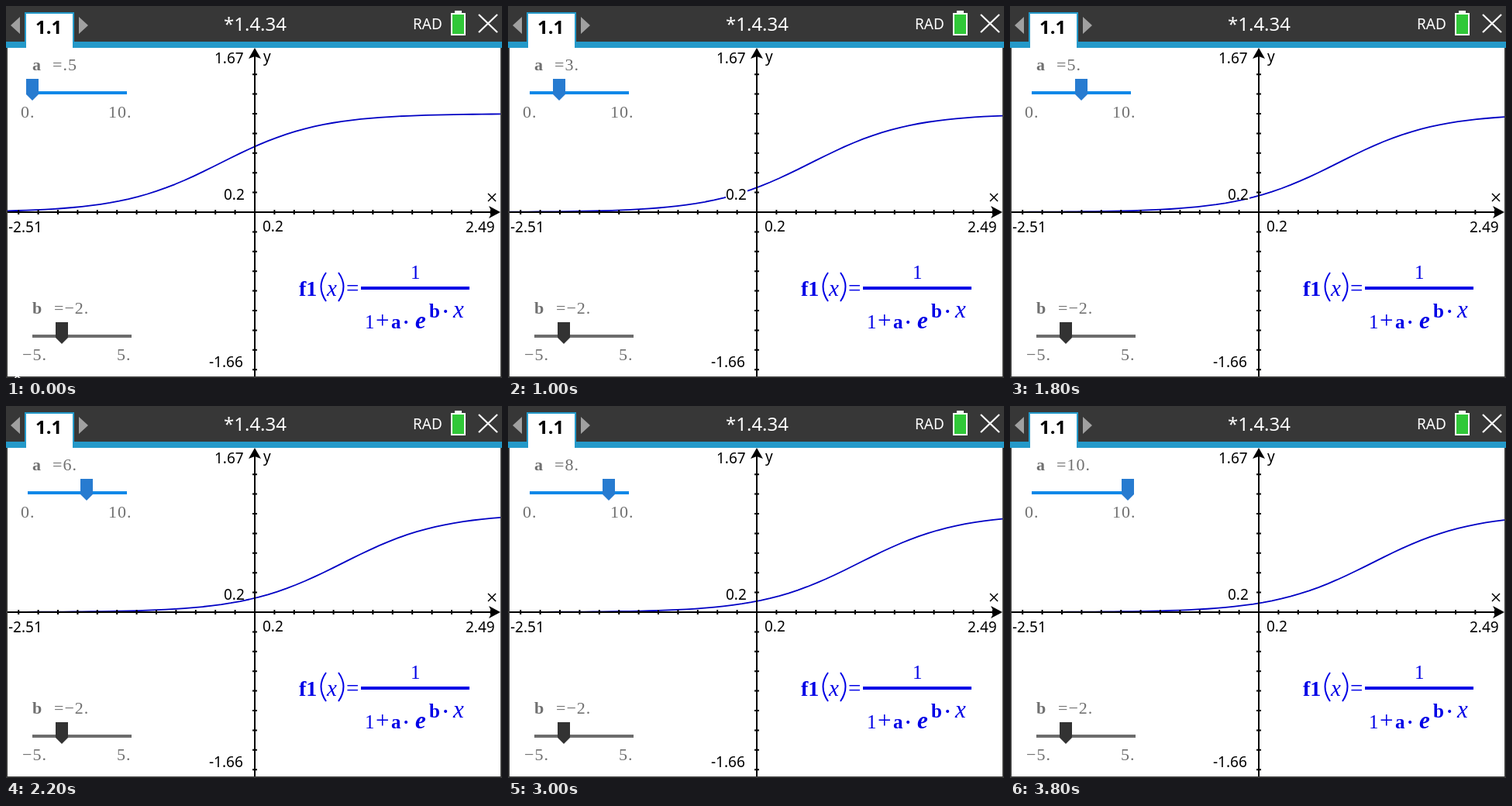
Recreate the animation shown at these times as an HTML page. Size 640 by 480 pixels, loop 4 s.

```html
<!DOCTYPE html>
<html lang="en">
<head>
<meta charset="utf-8">
<title>Logistic curve with sliders</title>
<style>
  html, body { margin: 0; width: 100%; height: 100%; overflow: hidden; background: #373737; }
  svg { display: block; width: 640px; height: 480px; }
  text { white-space: pre; }
  .sans { font: 500 19px "Noto Sans", "Open Sans", sans-serif; }
  .title { font-size: 24px; font-weight: 400; }
  .tab { font-size: 24px; font-weight: 600; }
  .slider { font: 22px "Liberation Serif", "Noto Serif", serif; letter-spacing: 1px; fill: #707070; }
  .math { font: 25px "Liberation Serif", "Noto Serif", serif; fill: #0000e6; }
  .bold { font-weight: 700; }
  .italic { font-style: italic; }
  .stroke { fill: none; stroke: #000; stroke-width: 2; }
</style>
</head>
<body>
<svg viewBox="0 0 640 480">
  <!-- header -->
  <rect width="640" height="480" fill="#373737"/>
  <rect y="46" width="640" height="8" fill="#2499c9"/>
  <rect x="2" y="54" width="636" height="424" fill="#fff"/>
  <rect x="24" y="8" width="64" height="46" fill="#2499c9"/>
  <rect x="26" y="10" width="60" height="44" fill="#fff"/>
  <path d="M18 14V36L6 25ZM94 14V36L106 25Z" fill="#a0a0a0"/>
  <text class="sans tab" x="38" y="36">1.1</text>
  <g fill="#fff">
    <text class="sans title" x="281" y="32">*1.4.34</text>
    <text class="sans" x="525" y="30">RAD</text>
    <path d="M579 6H588V9H593V38H574V9H579Z"/>
  </g>
  <rect x="576" y="11" width="15" height="25" fill="#30c838"/>
  <path d="M610 11L634 34M634 11L610 34" stroke="#fff" stroke-width="2.2"/>

  <!-- graph -->
  <path id="curve" fill="none" stroke="#0000c4" stroke-width="1.8" stroke-linejoin="round"/>
  <path class="stroke" d="M2 266H630M321 62V478"/>
  <path id="ticks" class="stroke"/>
  <path d="M638 266L623 258L627 266L623 274ZM321 54L313 68L321 65L329 68Z"/>
  <rect x="281" y="236" width="28" height="14" fill="#fff"/>
  <g class="sans">
    <text x="269" y="74">1.67</text>
    <text x="281" y="250">0.2</text>
    <text x="331" y="291">0.2</text>
    <text x="3" y="292">-2.51</text>
    <text x="593" y="292">2.49</text>
    <text x="262" y="466">-1.66</text>
    <text x="332" y="72">y</text>
  </g>
  <path d="M622 242L632 252M632 242L622 252" stroke="#000" stroke-width="1.5"/>

  <!-- slider a -->
  <g class="slider">
    <text class="bold" x="34" y="83">a</text>
    <text id="value" x="60" y="83"></text>
    <text x="19" y="144">0.</text>
    <text x="132" y="144">10.</text>
  </g>
  <rect x="28" y="110" width="128" height="4" fill="#0f88e8"/>
  <path id="knob" d="M-8 94H8V114L0 122L-8 114Z" fill="#277bd0"/>

  <!-- slider b -->
  <g class="slider">
    <text class="bold" x="34" y="397">b</text>
    <text x="62" y="397">=−2.</text>
    <text x="21" y="457">−5.</text>
    <text x="143" y="457">5.</text>
  </g>
  <rect x="34" y="424" width="128" height="4" fill="#6c6c6c"/>
  <path d="M64 408H80V428L72 436L64 428Z" fill="#333"/>

  <!-- formula -->
  <g class="math">
    <text class="bold" x="378" y="374" font-size="28" style="font-size:28px">f1</text>
    <text class="italic" x="414" y="374" style="font-size:29px">x</text>
    <text x="439" y="374" style="font-size:29px">=</text>
    <text x="522" y="352">1</text>
    <text x="463" y="416">1</text>
    <text x="477" y="416" style="font-size:31px">+</text>
    <text class="bold" x="497" y="416">a</text>
    <text class="bold" x="512" y="416">·</text>
    <text class="bold italic" x="528" y="416" style="font-size:31px">e</text>
    <text class="bold" x="546" y="402">b</text>
    <text class="bold" x="563" y="402">·</text>
    <text class="italic" x="577" y="402" style="font-size:31px">x</text>
  </g>
  <path d="M413 344Q400 362 413 381M429 344Q442 362 429 381" fill="none" stroke="#0000e6" stroke-width="2"/>
  <rect x="458" y="362" width="140" height="4" fill="#0000e6"/>

  <path id="pointer" d="M0 475L8 481M5 475L0 481" fill="none" stroke="#fff" stroke-width="1.5"/>
</svg>
<script>
  const LOOP = 4000, STEP = 200;
  const UNIT = 127, X0 = 321, Y0 = 266, B = -2;
  const el = id => document.getElementById(id);

  function drawTicks() {
    let d = "";
    for (let k = -12; k <= 12; k++) {
      if (!k) continue;
      const s = k * UNIT / 5;
      d += `M${X0 + s} 263v6`;
      if (Math.abs(k) <= 8) d += `M318 ${Y0 + s}h6`;
    }
    el("ticks").setAttribute("d", d);
  }

  function curvePath(a) {
    const points = [];
    for (let px = 2; px <= 638; px += 12) {
      const y = 1 / (1 + a * Math.exp(B * (px - X0) / UNIT));
      points.push(px + " " + (Y0 - UNIT * y).toFixed(2));
    }
    return "M" + points.join("L");
  }

  // Numbers drop a leading zero and keep a trailing point.
  function format(a) {
    return Number.isInteger(a) ? a + "." : String(a).replace(/^0/, "");
  }

  let shown = -1;
  function draw() {
    const step = Math.floor(performance.now() % LOOP / STEP);
    if (step !== shown) {
      shown = step;
      const a = (step + 1) / 2;
      const knobX = 2 * Math.min(76, Math.round(14 + 6.4 * a));
      el("curve").setAttribute("d", curvePath(a));
      el("value").textContent = "=" + format(a);
      el("knob").setAttribute("transform", `translate(${knobX})`);
      el("pointer").setAttribute("transform", `translate(${11 - 5 * step} ${step / 2})`);
      el("pointer").style.display = step < 4 ? "" : "none";
    }
    requestAnimationFrame(draw);
  }

  drawTicks();
  draw();
</script>
</body>
</html>
```
